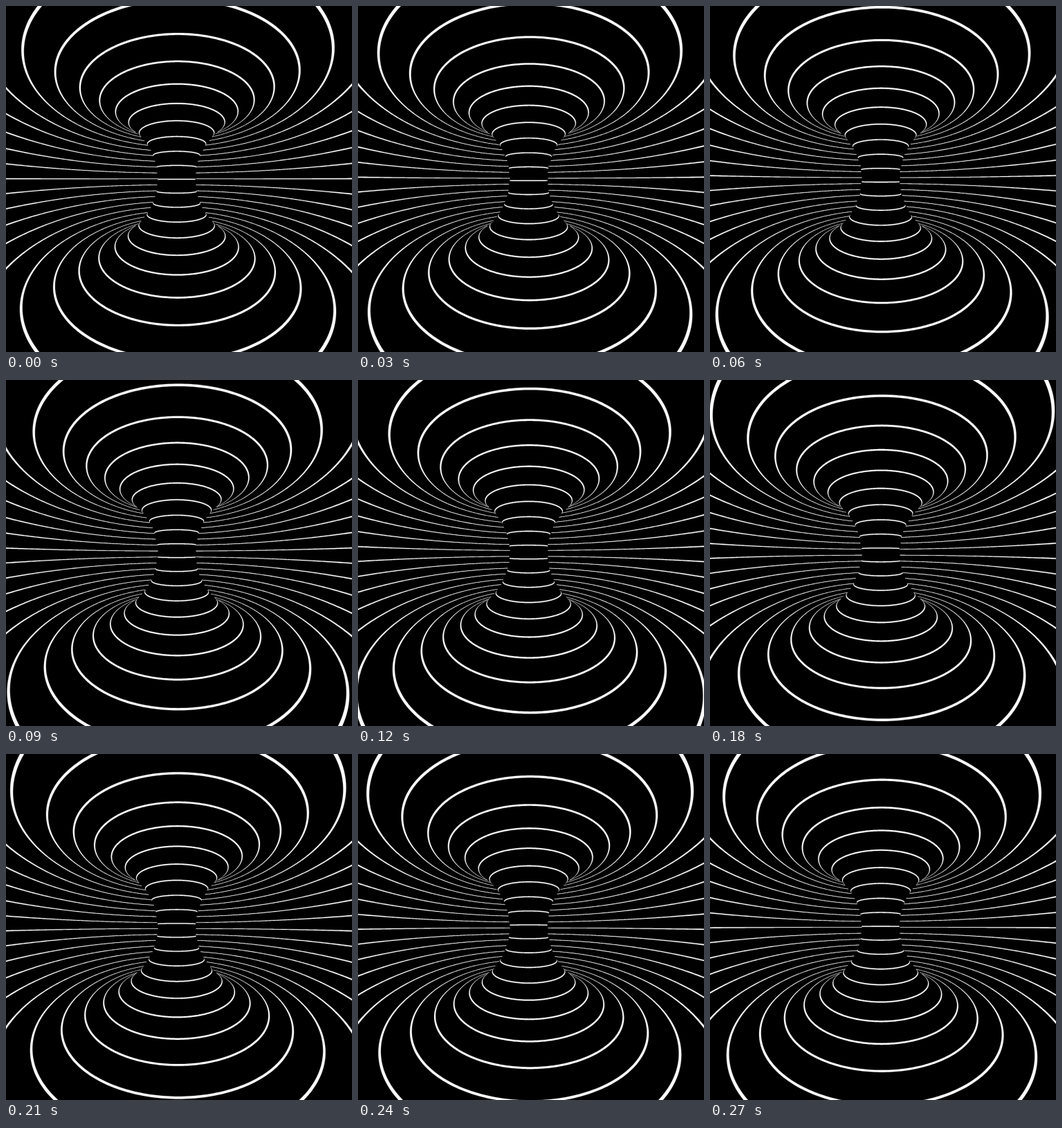
An HTML page that plays this animation: 500x500 px, repeating every 0.3 s.

```html
<!DOCTYPE html>
<html lang="en">
<head>
<meta charset="utf-8">
<title>Torus rings</title>
<style>
html, body { margin: 0; width: 100%; height: 100%; overflow: hidden; background: #000; }
svg { display: block; width: 100vw; height: 100vh; }
</style>
</head>
<body>
<svg viewBox="0 0 500 500">
  <rect width="500" height="500" fill="#000"/>
  <path id="rings" fill="#fff" stroke="#fff" stroke-width="0.3" stroke-linejoin="round"/>
</svg>
<script>
// View from inside a torus tube towards its inner wall.
// Lengths are in units of the distance from the camera to the axis.
const LOOP = 300, HOLD = 30, STEPS = LOOP / HOLD;
const RINGS = 32, GAP = 2 * Math.PI / RINGS;
const MAJOR = 0.583, MINOR = 0.4467;
const FOCAL = 196.5, CX = 245, CY = 250, SIDE = 0.0076;
const BAND = 0.065 * GAP;
const START = 0.02, SPEED = 0.1033; // in ring gaps, per step
const SAMPLES = 480, NEAR = 0.04;

const path = document.getElementById('rings');
const cache = [];

function point(theta, phi) {
  const r = MAJOR - MINOR * Math.cos(theta);
  return {
    x: r * Math.sin(phi) + SIDE,
    y: MINOR * Math.sin(theta),
    z: 1 - r * Math.cos(phi)
  };
}

function project(p) {
  const k = FOCAL / Math.max(p.z, NEAR / 2);
  return (CX + p.x * k).toFixed(2) + ' ' + (CY - p.y * k).toFixed(2);
}

// A wall point is seen when the sight line stays inside the tube up to it.
function visible(p, theta, phi) {
  if (p.z < NEAR) return false;
  const n = -Math.cos(theta);
  const facing = p.x * n * Math.sin(phi) + p.y * Math.sin(theta) - p.z * n * Math.cos(phi);
  if (facing <= 0) return false;
  for (let i = 1; i < 40; i++) {
    const t = i / 40;
    const d = Math.hypot(p.x * t - SIDE, 1 - p.z * t) - MAJOR;
    const y = p.y * t;
    if (d * d + y * y > MINOR * MINOR + 1e-5) return false;
  }
  return true;
}

function ring(theta) {
  let d = '', a = [], b = [];
  const flush = () => {
    if (a.length > 1) d += 'M' + a.concat(b.reverse()).join('L') + 'Z';
    a = [];
    b = [];
  };
  for (let i = 0; i <= SAMPLES; i++) {
    const phi = (2 * i / SAMPLES - 1) * Math.PI;
    if (visible(point(theta, phi), theta, phi)) {
      a.push(project(point(theta - BAND / 2, phi)));
      b.push(project(point(theta + BAND / 2, phi)));
    } else flush();
  }
  flush();
  return d;
}

function outline(step) {
  let d = '';
  for (let k = 0; k < RINGS; k++) d += ring((k - START - step * SPEED) * GAP);
  return d;
}

for (let s = 0; s < STEPS; s++) cache.push(outline(s));

let shown = -1;
function draw(ms) {
  const step = Math.floor((ms % LOOP) / HOLD) % STEPS;
  if (step !== shown) path.setAttribute('d', cache[shown = step]);
}

const begin = performance.now();
function tick() {
  draw(performance.now() - begin);
  requestAnimationFrame(tick);
}
tick();
</script>
</body>
</html>
```
